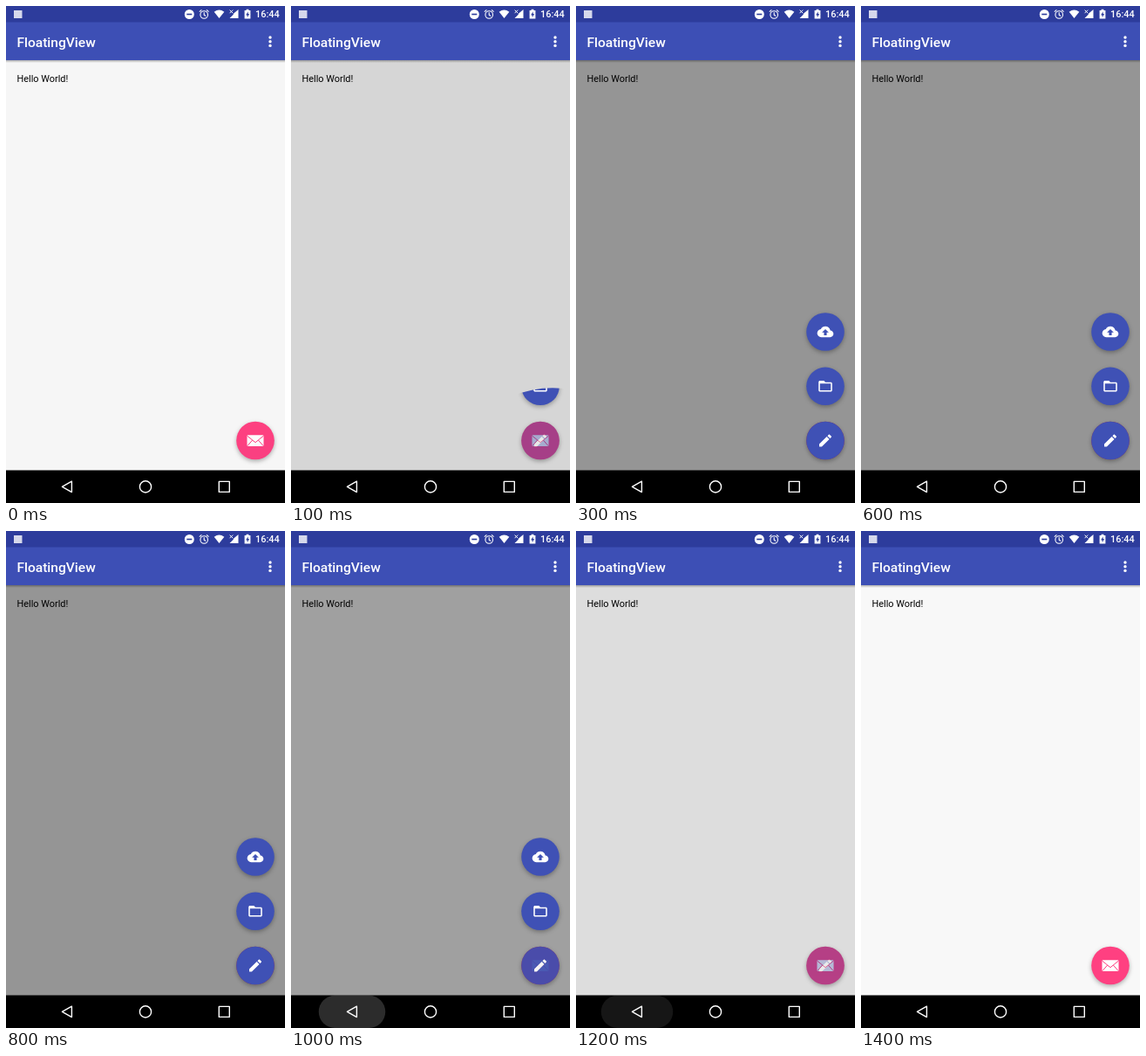
These frames come from a looping animation (320 by 569 pixels, 1.6 s). An HTML page:

```html
<!DOCTYPE html>
<html lang="en">
<head>
<meta charset="utf-8">
<title>Floating action menu</title>
<style>
  html, body { margin: 0; width: 100%; height: 100%; overflow: hidden; background: #000; }
  svg { display: block; width: 100vw; height: 100vh; }
  text { font-family: Roboto, sans-serif; font-size: 10.9px; }
  .fab { filter: drop-shadow(0 2.5px 2.5px rgba(0, 0, 0, .3)); }
  .line { fill: none; stroke: #fff; stroke-width: 1.4; stroke-linejoin: round; }
</style>
</head>
<body>
<svg viewBox="0 0 320 569" preserveAspectRatio="none">
  <defs>
    <clipPath id="reveal"><circle id="hole" cx="300" cy="559" r="0"/></clipPath>
    <linearGradient id="edge" x2="0" y2="1">
      <stop stop-opacity=".3"/><stop offset="1" stop-opacity="0"/>
    </linearGradient>
  </defs>

  <rect width="320" height="532" fill="#f8f8f8"/>
  <text x="12.5" y="87">Hello World!</text>

  <g class="fab" transform="translate(286 497.5)">
    <circle r="21.8" fill="#ff4081"/>
    <rect x="-9.5" y="-6.3" width="19" height="12.8" rx="1.2" fill="#fff"/>
    <path d="M-9.5-5.5 0 2.2 9.5-5.5M-9 6-3.4-.4M9 6 3.4-.4" fill="none" stroke="#ff4081" stroke-width="1"/>
  </g>

  <rect id="shade" y="62" width="320" height="470" opacity="0"/>

  <g clip-path="url(#reveal)">
    <g class="fab" transform="translate(286 373)">
      <circle r="21.8" fill="#3f51b5"/>
      <path transform="scale(.778) translate(-12 -12)" fill="#fff" d="M19.35 10.04C18.67 6.59 15.64 4 12 4 9.11 4 6.6 5.64 5.35 8.04 2.34 8.36 0 10.91 0 14c0 3.31 2.69 6 6 6h13c2.76 0 5-2.24 5-5 0-2.64-2.05-4.78-4.65-4.96zM14 13v4h-4v-4H7l5-5 5 5h-3z"/>
    </g>
    <g class="fab" transform="translate(286 435.3)">
      <circle r="21.8" fill="#3f51b5"/>
      <path transform="scale(.778) translate(-12 -12)" fill="#fff" d="M20 6h-8l-2-2H4c-1.1 0-2 .9-2 2v12c0 1.1.9 2 2 2h16c1.1 0 2-.9 2-2V8c0-1.1-.9-2-2-2zm0 12H4V8h16v10z"/>
    </g>
    <g id="edit" opacity="0" transform="translate(286 497.5)">
      <circle r="21.8" fill="#3f51b5"/>
      <path transform="scale(.778) translate(-12 -12)" fill="#fff" d="M3 17.25V21h3.75L17.81 9.94l-3.75-3.75L3 17.25zM20.71 7.04c.39-.39.39-1.02 0-1.41l-2.34-2.34c-.39-.39-1.02-.39-1.41 0l-1.83 1.83 3.75 3.75 1.83-1.83z"/>
    </g>
  </g>

  <!-- app bar -->
  <rect y="62" width="320" height="3" fill="url(#edge)"/>
  <rect width="320" height="62" fill="#3d4fb5"/>
  <rect width="320" height="18.5" fill="#2d3c9c"/>
  <text x="12.4" y="46.6" fill="#fff" style="font-size:15.56px;font-weight:500">FloatingView</text>
  <g fill="#fff">
    <circle cx="303" cy="36" r="1.7"/><circle cx="303" cy="40.7" r="1.7"/><circle cx="303" cy="45.4" r="1.7"/>
  </g>

  <!-- status icons -->
  <g fill="#fff">
    <rect x="9" y="5" width="9.5" height="9" fill="#d5d8eb"/>
    <circle cx="210.3" cy="9.5" r="5.5"/>
    <rect x="207.3" y="8.7" width="6" height="1.6" fill="#2d3c9c"/>
    <g fill="none" stroke="#fff" stroke-width="1.1">
      <circle cx="227.2" cy="10" r="4.3"/>
      <path d="M227.2 7.3v3l2 1.2M221.8 6.6l2.6-2.2M232.6 6.6 230-4.4" visibility="hidden"/>
      <path d="M227.2 7.3v3l2 1.2M221.8 6.6l2.6-2.2M232.6 6.6l-2.6-2.2"/>
    </g>
    <path d="M238.7 6.7q5.8-4.6 11.6 0L244.5 14z"/>
    <path d="M266.5 4v10h-10l4.3-4.3V9l1-1z"/>
    <path d="M256.6 4.6l3.6 3.6m0-3.6-3.6 3.6" stroke="#fff" fill="none"/>
    <path d="M275.6 4.9V3.8h2.8v1.1h2v9.6h-6.8V4.9z"/>
    <path d="M277.6 6.3l-2.5 4.1h1.6v2.8l2.4-4.1h-1.5z" fill="#2d3c9c"/>
    <text x="286" y="13.4" style="font-weight:500">16:44</text>
  </g>

  <!-- navigation bar -->
  <rect y="531.5" width="320" height="37.5"/>
  <rect id="ripple" y="531.8" height="37.2" rx="18.6" fill="#fff" opacity="0"/>
  <path class="line" d="M64.4 550.4 75.4 544.2V556.6z"/>
  <circle class="line" cx="160" cy="550.4" r="6.6"/>
  <rect class="line" x="244.3" y="544.4" width="12" height="12"/>
</svg>
<script>
  const LOOP = 1600, STEP = 100, PRESS = 891, CLOSE = 900;
  const $ = id => document.getElementById(id);
  const set = (id, attrs) => {
    for (const k in attrs) $(id).setAttribute(k, attrs[k]);
  };
  const clamp = x => Math.min(1, Math.max(0, x));
  const ease = x => (1 - Math.cos(Math.PI * clamp(x))) / 2;

  function draw(t) {
    const closing = t >= CLOSE;
    const p = closing ? 1 - ease((t - CLOSE) / 463) : ease((t + 25) / 315);
    set('shade', { opacity: 0.4 * p });
    set('edit', { opacity: p });
    set('hole', { r: closing ? 40 + 190 * p : 60 + 181 * p });

    // touch feedback on the back key: logarithmic growth, linear fade
    const age = t - PRESS;
    const w = age > 0 ? 82.5 * (1 - Math.pow(400, -1.4 * clamp(age / 350))) : 0;
    set('ripple', {
      x: 70 - w / 2,
      width: w,
      opacity: age > 0 ? 0.2 * clamp((1390 - t) / 450) : 0
    });
  }

  function tick(now) {
    draw(Math.floor(now % LOOP / STEP) * STEP);
    requestAnimationFrame(tick);
  }
  draw(0);
  requestAnimationFrame(tick);
</script>
</body>
</html>
```
